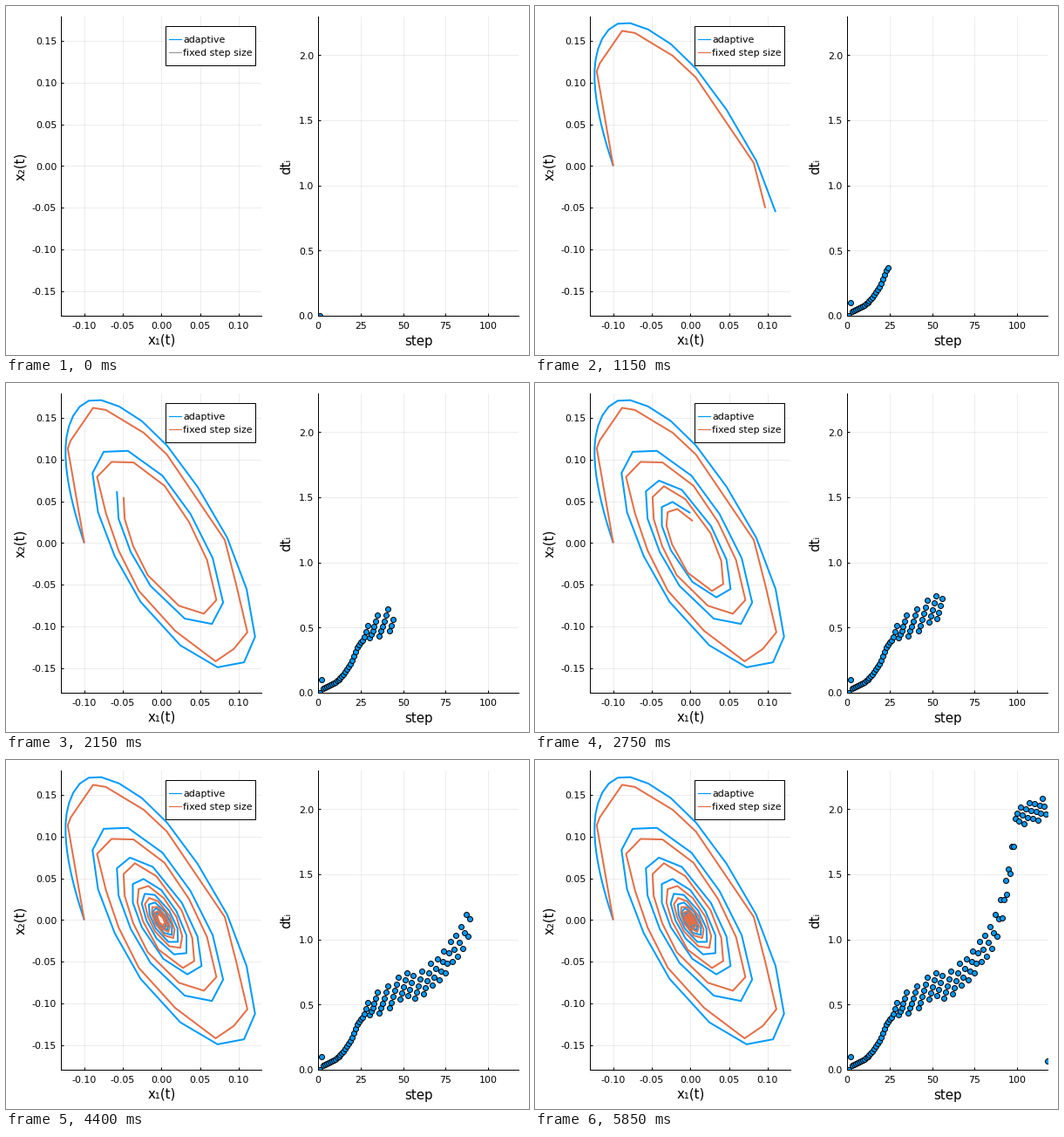
These frames come from a looping animation (600 by 400 pixels, 5900 ms). A matplotlib script:

```python
import numpy as np
import matplotlib.pyplot as plt
from matplotlib.animation import FuncAnimation
from matplotlib.lines import Line2D
from matplotlib.patches import Rectangle

W, H, DPI = 600, 400, 100
PX = 72 / DPI
N = 118
BLUE, ORANGE, GREY = "#009afa", "#e36f47", "#999999"
TICK, TITLE = 11, 15
plt.rcParams["font.family"] = "DejaVu Sans"

# First turn of each path, one point per eighth of a turn
ADAPTIVE_KEYS = [(-.1, 0), (-.124, .118), (-.088, .172), (-.003, .1275),
                 (.088, .001), (.121, -.1195), (.0715, -.149),
                 (-.0105, -.091), (-.071, .006), (-.089, .087)]
FIXED_KEYS = [(-.1, 0), (-.122, .117), (-.085, .167), (-.0045, .122),
              (.084, .001), (.113, -.1136), (.0715, -.143),
              (-.016, -.082), (-.0644, .0075), (-.0835, .0796)]
# Typical step size at a few step numbers
TREND = [(3, .038), (23, .35), (29, .47), (36, .53), (48, .61), (64, .69),
         (78, .87), (90, 1.22), (94, 1.36), (100, 1.96), (117, 2.0)]


def step_sizes():
    """Growing steps that swell during each half turn and then drop back."""
    at, size = np.array(TREND).T
    dt = np.exp(np.interp(np.arange(1, N + 1), at, np.log(size)))
    dt[:2] = 0, .1
    t = dt[:2].sum()
    for i in range(2, N):
        swing = np.interp(i + 1, [26, 30, 35, 88, 100], [0, .3, .4, .28, .09])
        dt[i] *= 1 + swing * ((t - 2.2) / np.pi % 1 - .5)
        t += dt[i]
    dt[-1] = .065
    return dt


def spiral(keys, shrink, spacing):
    """Repeat the first turn ever smaller; returns times and points."""
    pts = [np.array(k) for k in keys]
    while len(pts) * spacing < T[-1] + spacing:
        pts.append(shrink * pts[-8])
    return spacing * np.arange(len(pts)), np.array(pts)


def linear(grid, pts):
    return np.column_stack([np.interp(T, grid, c) for c in pts.T])


def smooth(grid, pts):
    slope = np.gradient(pts, axis=0, edge_order=2)
    pos = T / grid[1]
    k = np.minimum(pos.astype(int), len(pts) - 2)
    s = (pos - k)[:, None]
    ease = s * s * (3 - 2 * s)
    return (pts[k] * (1 - ease) + pts[k + 1] * ease
            + slope[k] * s * (1 - s)**2 - slope[k + 1] * s * s * (1 - s))


def label(x, y, s, size, **kw):
    fig.text(x / W, 1 - y / H, s, fontsize=size * PX, **kw)


def panel(x0, xlim, ylim, xticks, yticks, xfmt, yfmt):
    x1, top, bottom = x0 + 230.2, 11.5, 355.2
    ax = fig.add_axes([x0 / W, 1 - bottom / H, (x1 - x0) / W, (bottom - top) / H])
    ax.set(xlim=xlim, ylim=ylim, xticks=xticks, yticks=yticks)
    ax.patch.set_visible(False)
    ax.set_axisbelow(True)
    ax.grid(color="black", alpha=.1, lw=.5)
    ax.spines[["top", "right"]].set_visible(False)
    ax.spines[["left", "bottom"]].set_linewidth(PX)
    ax.tick_params(direction="in", length=3 * PX, width=PX,
                   labelbottom=False, labelleft=False)
    for x, v in zip(np.interp(xticks, xlim, (x0, x1)), xticks):
        label(x, 369.6, xfmt % v, TICK, ha="center", va="baseline")
    for y, v in zip(np.interp(yticks, ylim, (bottom, top)), yticks):
        label(x0 - 5, y + 4.2, yfmt % v, TICK, ha="right", va="baseline")
    return ax


def legend_entry(y, text, color):
    line = Line2D([187 / W, 201 / W], [1 - y / H] * 2, color=color, lw=1.2 * PX,
                  transform=fig.transFigure, zorder=11)
    fig.add_artist(line)
    label(203, y + 4.3, text, TICK, va="baseline", zorder=11)
    return line


DT = step_sizes()
T = np.cumsum(DT)
STEP = np.arange(1, N + 1)
ADAPTIVE = smooth(*spiral(ADAPTIVE_KEYS, .66, np.pi / 4))
FIXED = linear(*spiral(FIXED_KEYS, .64, .781))

fig = plt.figure(figsize=(W / DPI, H / DPI), dpi=DPI, facecolor="white")
phase_ax = panel(63.2, (-.13, .13), (-.18, .18), np.arange(-2, 3) * .05,
                 np.arange(-3, 4) * .05, "%.2f", "%.2f")
step_ax = panel(358.1, (0, N), (0, 2.3), np.arange(0, 101, 25),
                np.arange(5) * .5, "%d", "%.1f")

label(178.4, 388, "x₁(t)", TITLE, ha="center", va="baseline")
label(473, 388.5, "step", TITLE, ha="center", va="baseline")
label(17, 183.7, "x₂(t)", TITLE, ha="center", va="center", rotation=90)
label(322, 183.7, "dtᵢ", TITLE, ha="center", va="center", rotation=90)

fig.add_artist(Rectangle((183 / W, 1 - 68 / H), 102.5 / W, 45 / H,
                         transform=fig.transFigure, fc="white", ec="black",
                         lw=PX, zorder=10))
legend_entry(38, "adaptive", BLUE)
fixed_key = legend_entry(53, "fixed step size", GREY)

style = dict(lw=2 * PX, solid_joinstyle="round", solid_capstyle="butt")
adaptive_line, = phase_ax.plot([], [], color=BLUE, **style)
fixed_line, = phase_ax.plot([], [], color=ORANGE, **style)
dots, = step_ax.plot([], [], "o", ms=6 * PX, mfc=BLUE, mec="black", mew=PX)


def draw(i):
    n = i + 1
    adaptive_line.set_data(*ADAPTIVE[:n].T)
    fixed_line.set_data(*FIXED[:n].T)
    dots.set_data(STEP[:n], DT[:n])
    fixed_key.set_color(GREY if n <= 13 else ORANGE)
    return adaptive_line, fixed_line, dots, fixed_key


anim = FuncAnimation(fig, draw, frames=N, interval=50, repeat=True,
                     repeat_delay=0, blit=False)
plt.show()
```
